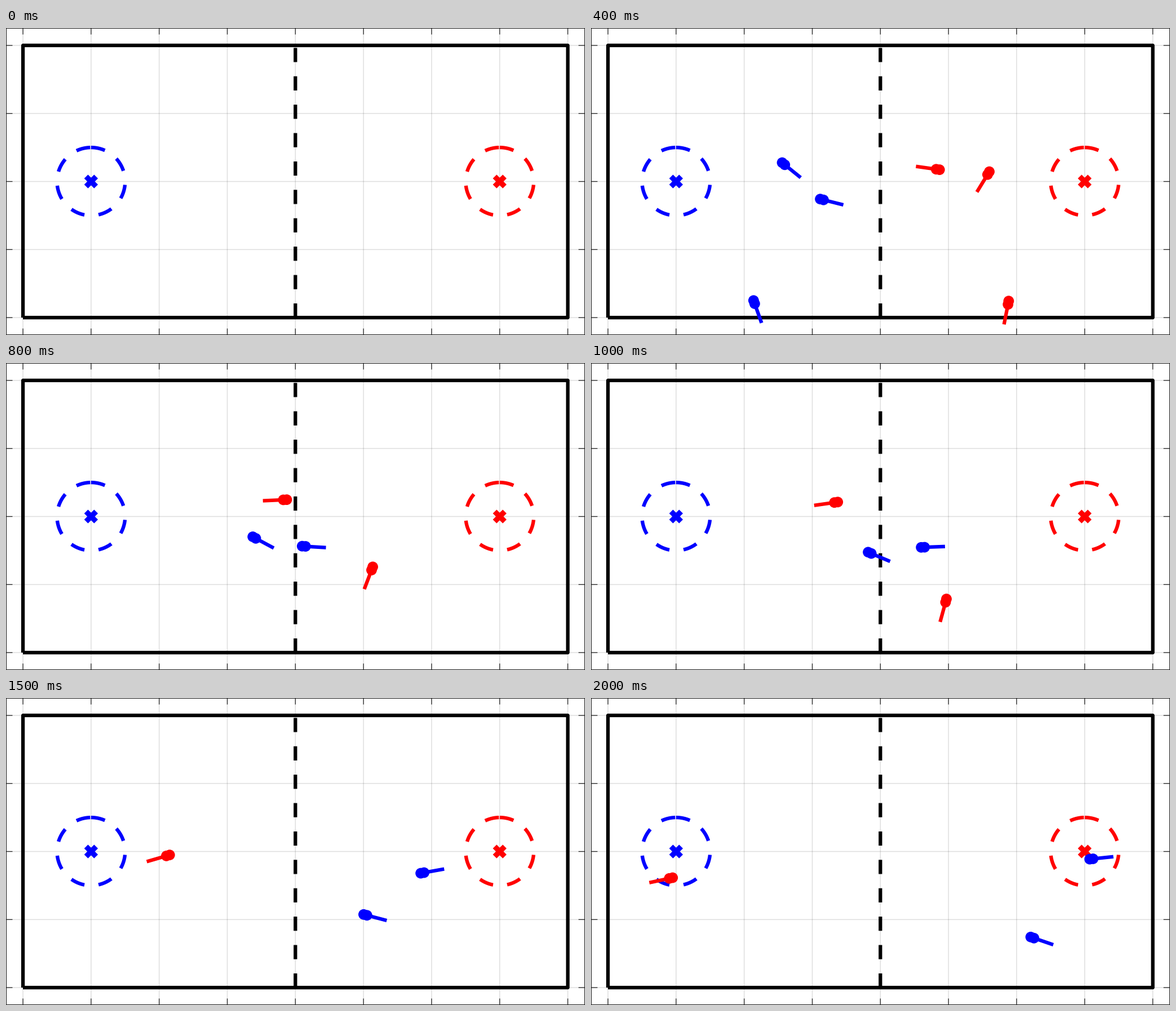
A matplotlib script for the animation above (2100 ms loop, 1027 by 545 pixels).

```python
import numpy as np
import matplotlib.pyplot as plt
from matplotlib.animation import FuncAnimation
from matplotlib.patches import Circle

W, H, DPI = 1027, 545, 64
PT = 72 / DPI                 # points per pixel
UNIT = 120.8                  # one field unit in pixels
CX, CY = W / 2 - 0.2, H / 2
LINE = 6.3
FRAMES, INTERVAL = 21, 100
BLUE, RED, DARK = "#0000ff", "#ff0000", "#262626"

fig = plt.figure(figsize=(W / DPI, H / DPI), dpi=DPI, facecolor="white")
ax = fig.add_axes([0, 0, 1, 1])
ax.set_xlim(0, W)
ax.set_ylim(H, 0)
ax.axis("off")


def stroke(x, y, color, width=LINE, z=2, **kw):
    return ax.plot(x, y, color=color, lw=width * PT, zorder=z, snap=False,
                   solid_capstyle="butt", **kw)[0]


def dashed(x, y, color):
    stroke(x, y, color, linestyle=(0, (4, 4)), dash_capstyle="butt",
           dash_joinstyle="round")


def draw_axes():
    tick = 11.5
    for i in range(-4, 5):
        x = CX + i * UNIT
        stroke([x, x], [0, H], DARK, 1.5, 0, alpha=0.15)
        for a, b in ((0, tick), (H - tick, H)):
            stroke([x, x], [a, b], DARK, 1.3, 1)
    for j in range(-2, 3):
        y = CY + j * UNIT
        stroke([0, W], [y, y], DARK, 1.5, 0, alpha=0.15)
        for a, b in ((0, tick), (W - tick, W)):
            stroke([a, b], [y, y], DARK, 1.3, 1)
    right, bottom = W - 0.5, H - 0.5
    stroke([0.5, right, right, 0.5, 0.5], [0.5, 0.5, bottom, bottom, 0.5],
           DARK, 1.2, 1)


def draw_field():
    left, right = CX - 4 * UNIT, CX + 4 * UNIT
    top, bottom = CY - 2 * UNIT, CY + 2 * UNIT
    stroke([left, left, right, right, left],
           [bottom, top, top, bottom, bottom], "black",
           solid_joinstyle="round")
    dashed([CX, CX], [bottom, top], "black")


def draw_goal(x, color):
    a = np.linspace(0, 2 * np.pi, 241)
    r = UNIT / 2
    dashed(x + r * np.sin(a), CY - r * np.cos(a), color)
    arm = 8.8
    for s in (-1, 1):
        stroke([x - arm, x + arm], [CY - s * arm, CY + s * arm], color, 9.5)


def turn(n):
    """Heading swing in degrees, shared by all agents."""
    return -15 * np.cos(0.19 * (n - 15.85))


class Agent:
    """Moves at constant speed along a slowly swinging heading."""
    SPEED, STEP, REACH = 0.25 * UNIT, 0.05 * UNIT, 0.35 * UNIT

    def __init__(self, color, x, y, heading):
        angle = np.radians(heading + turn(np.arange(1, FRAMES)))
        self.dir = np.column_stack([np.cos(angle), np.sin(angle)])
        steps = np.vstack([[x, y], self.dir[:-1] * self.SPEED])
        self.pos = np.cumsum(steps, axis=0)
        self.line = stroke([], [], color, z=5)
        self.dots = [ax.add_patch(Circle((0, 0), 9.4, color=color, lw=0,
                                         zorder=5)) for _ in range(2)]
        self.parts = [self.line, *self.dots]

    def show(self, n):
        for part in self.parts:
            part.set_visible(n > 0)
        if n == 0:
            return
        p, d = self.pos[n - 1], self.dir[n - 1]
        end = p + d * self.REACH
        self.line.set_data([p[0], end[0]], [p[1], end[1]])
        self.dots[0].center = tuple(p)
        self.dots[1].center = tuple(p + d * self.STEP)


draw_axes()
draw_field()
draw_goal(CX - 3 * UNIT, BLUE)
draw_goal(CX + 3 * UNIT, RED)

# start point, and mean heading in degrees clockwise from right
agents = [
    Agent(BLUE, 272.2, 177.9, 29.5),
    Agent(BLUE, 320.2, 276.4, 4.6),
    Agent(BLUE, 263.3, 396.7, 61.0),
    Agent(RED, 707.0, 269.7, 178.6),
    Agent(RED, 758.4, 180.8, 112.0),
    Agent(RED, 763.9, 397.1, 91.8),
]


def update(n):
    for agent in agents:
        agent.show(n)
    return [part for agent in agents for part in agent.parts]


def reset():
    return update(0)


anim = FuncAnimation(fig, update, frames=FRAMES, init_func=reset,
                     interval=INTERVAL, repeat=True, repeat_delay=0)
plt.show()
```
